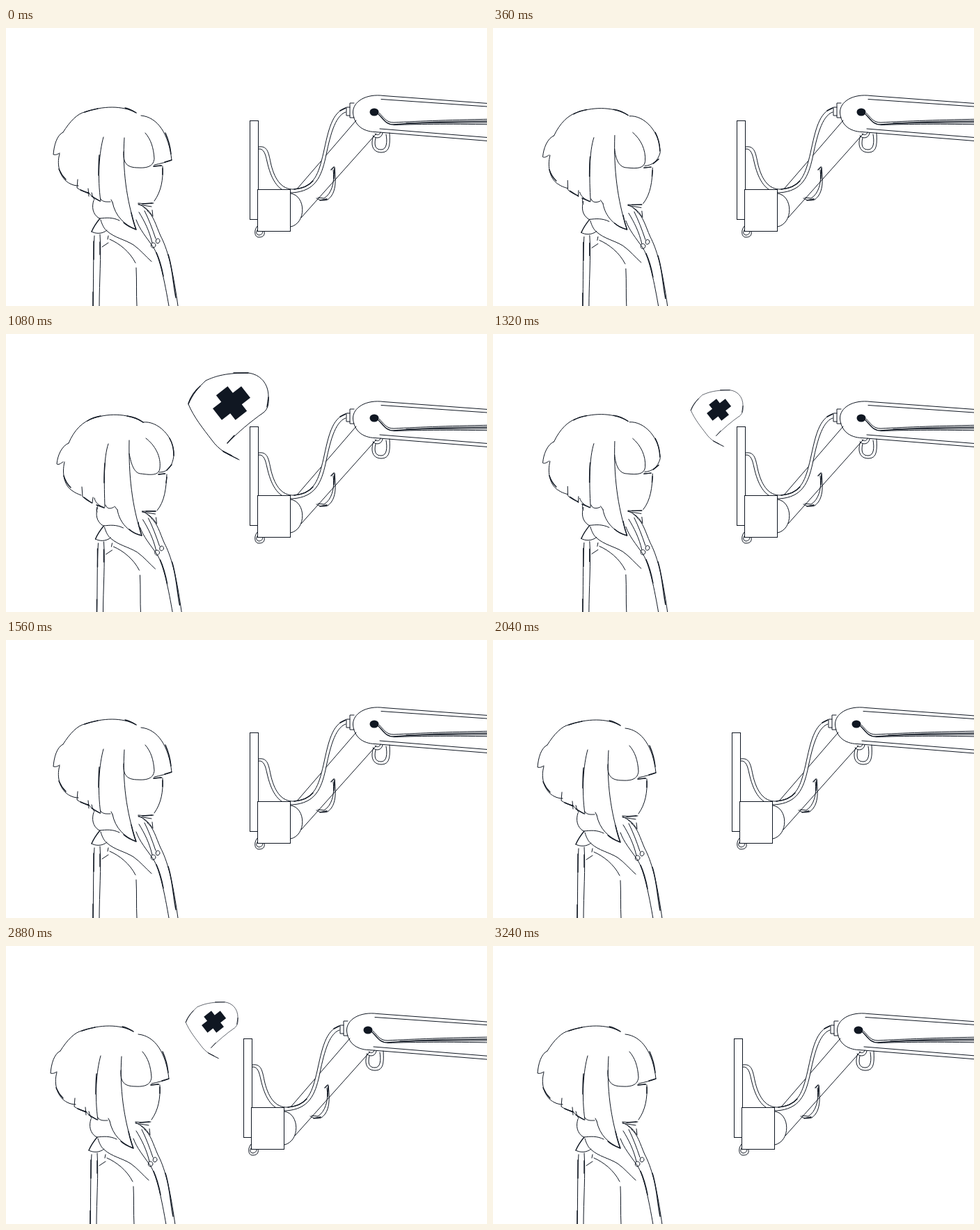
Write an HTML page that moves like this. It is 691 px wide and 400 px high and loops after 3.36 s.

```html
<!DOCTYPE html>
<html lang="en">
<head>
<meta charset="utf-8">
<title>Monitor arm</title>
<style>
  html, body { margin: 0; width: 100%; height: 100%; overflow: hidden; background: #fff; }
  svg { display: block; width: 100%; height: 100%; }
  path, rect { fill: none; stroke: #101722; stroke-width: 1; stroke-linecap: round;
    stroke-linejoin: round; }
  rect { stroke-linejoin: miter; }
  .bold { stroke-width: 1.4; }
  .white { fill: #fff; stroke: none; }
  .ink { fill: #101722; stroke: none; }
</style>
</head>
<body>
<svg viewBox="0 0 691 400">
  <g id="girl">
    <g id="head"></g>
    <g id="body">
      <path d="M126 248C123 257 124 268 134 274M163 277C153 272 144 273 135 274"/>
      <path class="bold" d="M135 274C130 280 126 286 123 293"/>
      <path d="M123 293C128 296 138 297 145 291M136 276C138 283 141 289 145 292C156 302 170 304 183 312C193 319 201 329 209 336"/>
      <path d="M127 299C125 330 126 365 125 400M135 297C137 327 134 365 134 400"/>
      <path class="bold" d="M126 307L126 333M135 308L135 326M125 380V400"/>
      <path d="M147 299L146 304M138 315L147 309M149 304C163 310 178 322 186 338M187 345C188 364 187 382 188 400"/>
      <path d="M187 276C192 290 201 300 212 316C221 331 228 365 234 400"/>
      <path class="bold" d="M216 323C221 334 224 346 226 357M233 326C239 344 240 368 244 388"/>
      <path d="M203 263C212 270 215 283 222 299C231 316 239 342 247 400"/>
      <path d="M191 265C199 278 206 292 210 309M199 263C205 275 210 288 215 303M190 253C198 257 205 261 210 270M210 262L211 271"/>
      <path d="M190 254L209 257M197 257L204 263"/>
      <path d="M209 310C206 316 213 319 215 313C215 309 211 308 209 310M216 304C213 310 219 312 221 307C221 303 218 302 216 304"/>
    </g>
  </g>

  <g id="arm">
    <path d="M416 234L503 133M424 273L532 152"/>
    <path d="M409 238C431 241 432 281 409 286"/>
    <path d="M711 109.900L543 97.500C517 94 498 106 498.500 122C500 139 512 149 530 149.500L711 164"/>
    <path d="M539 102.500L711 114.400M537 145L711 159.100"/>
    <ellipse class="ink" cx="529" cy="121" rx="6.500" ry="5.500"/>
    <path class="bold" d="M534 123C542 130 545 139 557 139C600 135 640 134 711 134"/>
    <path d="M536 122C543 129 546 136 557 136C595 134 640 132 711 131M557 139.500C600 138 640 138 711 139M575 137L711 136"/>
    <path d="M500 108H494V129H500M494 114H489V126H494"/>
    <path class="white" d="M363 171C375 169 377 178 380 193C385 216 395 233 414 232C444 229 449 209 456 180C463 148 468 121 488 115V121C472 126 465 158 459 187C453 213 445 235 411 237C389 236 380 214 375 192C373 183 371 173 363 174Z"/>
    <path d="M363 171C375 169 377 178 380 193C385 216 395 233 414 232C444 229 449 209 456 180C463 148 468 121 488 115"/>
    <path d="M363 174C371 173 373 183 375 192C380 214 389 236 411 237C445 235 453 213 459 187C465 158 472 126 488 121"/>
    <path class="bold" d="M414 232C427 231 435 227 441 220M480 119L488 115"/>
    <path d="M472 200C474 219 475 238 462 247C457 249 450 248 446 245M470 204C473 223 467 239 457 245L448 244"/>
    <path class="bold" d="M467 204L471 200M472 202L471 217M451 248L461 246"/>
    <path d="M528 155C523 168 527 179 539 179C551 179 552 169 551 151M531 158C528 171 532 175 539 175C547 175 548 164 546 153"/>
    <path d="M527 155C531 160 540 159 541 151M530 152C533 155 537 154 538 150"/>
    <path d="M362 284C355 291 357 302 364 301C371 301 372 296 371 292M364 287C357 294 360 298 364 298C368 297 369 295 369 292"/>
    <rect x="350.500" y="133.500" width="12" height="142"/>
    <rect x="361.500" y="232.500" width="47" height="60" style="fill:#fff"/>
  </g>

  <g id="bubble">
    <path d="M-58 -17C-52 -31 -43 -42 -33 -51C-18 -58 -3 -62 28 -62C45 -60 57 -47 57 -28C58 -17 56 -10 50 -5C30 9 14 23 -2 39"/>
    <path d="M-58 -17C-50 2 -37 18 -24 35C-14 49 -2 55 13 62M-9 50L15 63"/>
    <path class="bold" d="M-58 -18C-55 -27 -48 -37 -41 -43M7 -62L28 -62M-2 39L8 28M-8 51L4 57M57 -27L55 -13"/>
    <path class="ink" transform="translate(4 -18.500) rotate(-38)"
      d="M-10.500 -22.500H10.500V-10.500H26V10.500H10.500V22.500H-10.500V10.500H-26V-10.500H-10.500Z"/>
  </g>
</svg>
<script>
const LOOP = 3360;
const $ = id => document.getElementById(id);

// Head strokes: upright path, leaning path with the same commands, optional class.
const headStrokes = [
  ['M82 150C92 134 103 123 113 121C139 112 167 111 187 122',
   'M90 157C98 138 110 126 126 121C151 113 178 115 197 127'],
  ['M113 121C121 118 127 117 132 116M171 115C177 116 182 119 187 122',
   'M117 125C123 121 130 119 136 118M174 118C182 119 190 122 197 127', 'bold'],
  ['M82 150C73 154 69 169 68 182C71 183 74 182 77 180',
   'M90 157C80 161 74 175 73 187C75 189 79 186 82 184'],
  ['M77 181C72 198 78 217 92 224C96 226 100 227 104 227',
   'M84 184C80 202 84 219 96 226C100 229 103 230 108 232'],
  ['M103 218L102 230C106 233 112 236 119 237M118 231L119 242',
   'M109 220L110 234C113 237 118 241 124 243M125 235L124 243'],
  ['M119 237C123 243 128 246 135 249M136 246C139 251 145 250 150 250M151 247L153 251',
   'M127 236C128 243 134 247 141 250M143 246C145 252 150 252 155 249M156 248L160 253'],
  ['M76 203C79 210 82 214 86 218M107 233L119 238M123 242L135 249',
   'M83 204C85 211 89 217 93 221M112 235L123 243M130 246L141 250', 'bold'],
  ['M123 237C124 242 126 245 127 247', 'M132 247C129 252 130 254 131 256'],
  ['M140 157C134 178 131 215 136 249', 'M147 158C140 178 141 215 142 249'],
  ['M134 183C133 195 133 205 133 212', 'M142 186C141 197 141 207 141 214', 'bold'],
  ['M170 158C167 203 173 248 187 290C170 283 157 271 153 251',
   'M177 153C176 203 181 248 195 290C177 286 163 272 160 253'],
  ['M180 266C182 275 184 283 187 290C179 287 173 284 169 280',
   'M190 271C191 278 193 284 195 290C187 288 181 285 177 281', 'bold'],
  ['M169 178C168 195 174 201 190 201C206 202 212 197 213 188C212 172 208 160 200 151',
   'M177 172C180 189 185 201 194 201C208 203 220 204 221 193C223 176 214 160 201 150'],
  ['M194 126C218 128 234 153 238 190C231 193 222 195 213 197',
   'M197 127C217 124 243 148 241 175C239 191 232 199 220 199'],
  ['M229 151C233 160 236 171 237 181M238 190L228 193',
   'M235 150C239 157 241 166 241 175M238 188L231 196', 'bold'],
  ['M212 199L224 198M225 199C226 218 223 235 213 249M212 252C204 253 197 253 190 252',
   'M219 202L229 201M231 202C230 222 228 241 217 254M215 255C208 255 202 255 196 255'],
  ['M212 199L223 198M225 202L225 211M196 253L210 252',
   'M219 202L228 201M231 206L230 214M201 255L215 255', 'bold'],
];

const headPaths = headStrokes.map(([upright, leaning, weight = '']) => {
  const path = document.createElementNS('http://www.w3.org/2000/svg', 'path');
  path.setAttribute('class', weight);
  $('head').append(path);
  return { path, upright, targets: leaning.match(/-?[\d.]+/g).map(Number) };
});

// Stepped tracks: [start time, value...]
const leanTrack = [[0, 0], [240, .33], [360, .7], [480, 1], [1320, .7], [1440, .33], [1560, 0]];
const girlTrack = [[0, 0, 0], [1680, -4, 1]];
const armTrack = [[0, 0], [1680, -2], [1800, -4], [2040, -7], [2160, -8],
  [2280, -9], [3000, -8], [3120, -6], [3240, -4]];
// Bubble values are scale and pivot.
const hidden = [0, 0, 0];
const bubbleTrack = [
  [0, ...hidden], [720, .43, 320, 119], [840, .65, 322, 121], [960, .92, 320, 118],
  [1080, 1, 320, 118], [1320, .65, 322, 121], [1440, .43, 320, 119], [1560, ...hidden],
  [2280, .43, 294, 119], [2400, .65, 296, 121], [2520, .92, 294, 118],
  [2640, 1, 294, 118], [2880, .65, 296, 121], [3000, .43, 294, 119], [3120, ...hidden],
];

const valuesAt = (track, time) => track.findLast(key => key[0] <= time).slice(1);
const move = (id, x, y = 0) => $(id).setAttribute('transform', `translate(${x} ${y})`);

function poseHead(lean) {
  for (const { path, upright, targets } of headPaths) {
    let i = 0;
    path.setAttribute('d', upright.replace(/-?[\d.]+/g, n => +n + (targets[i++] - n) * lean));
  }
}

function draw(now) {
  const time = now % LOOP;
  const [lean] = valuesAt(leanTrack, time);
  poseHead(lean);
  move('body', 5.5 * lean, 2 * lean);
  move('girl', ...valuesAt(girlTrack, time));
  move('arm', ...valuesAt(armTrack, time));

  const [scale, x, y] = valuesAt(bubbleTrack, time);
  $('bubble').style.display = scale ? '' : 'none';
  $('bubble').setAttribute('transform', `translate(${x} ${y}) scale(${scale})`);
}

const start = performance.now();
function tick() {
  draw(performance.now() - start);
  requestAnimationFrame(tick);
}
tick();
</script>
</body>
</html>
```
